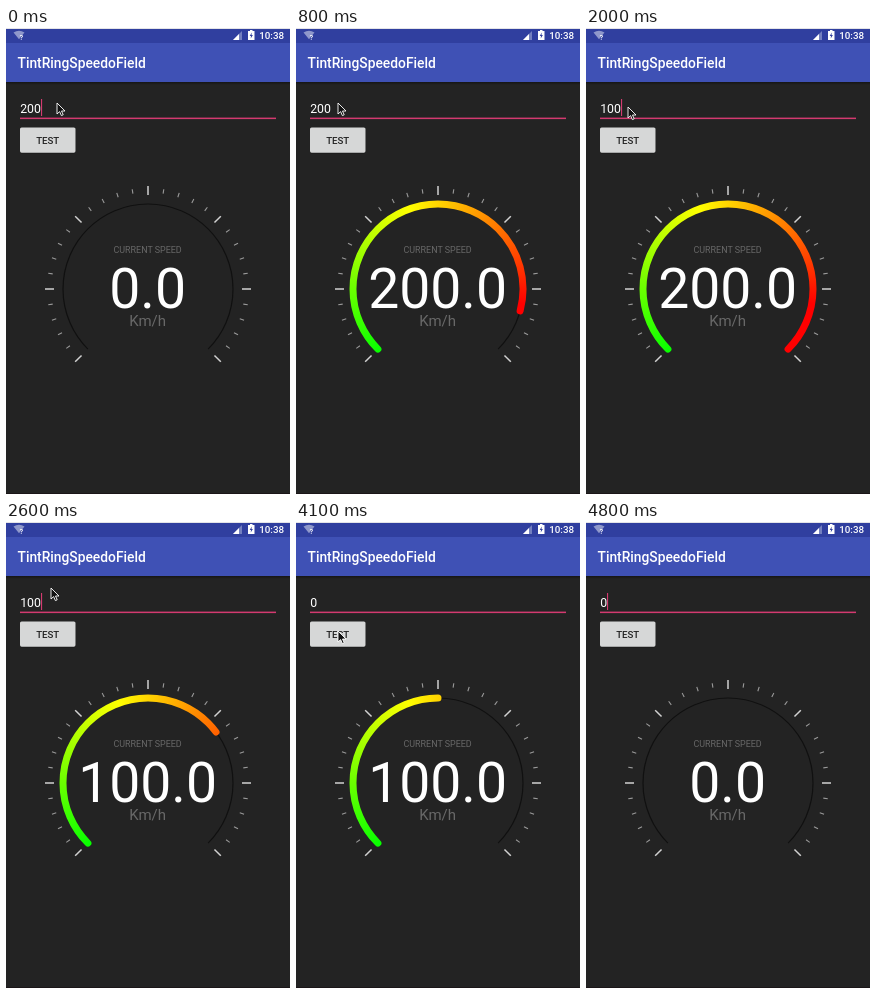
These frames come from a looping animation (284 by 466 pixels, 5 s). An HTML page with a canvas:

```html
<!DOCTYPE html>
<html lang="en">
<head>
<meta charset="utf-8">
<title>Speed gauge</title>
<style>
  html, body { margin: 0; width: 100%; height: 100%; overflow: hidden; background: #232323; }
  svg, canvas { position: absolute; left: 0; top: 0; width: 284px; height: 466px; display: block; }
  text { font-family: Roboto, "Noto Sans", sans-serif; fill: #fff; }
  .mid { text-anchor: middle; }
  .medium { font-weight: 500; }
  .dim { fill: #686868; }
</style>
</head>
<body>
<svg viewBox="0 0 284 466">
  <defs>
    <linearGradient id="shade" x1="0" y1="0" x2="0" y2="1">
      <stop offset="0" stop-color="#000" stop-opacity=".4"/>
      <stop offset="1" stop-color="#000" stop-opacity="0"/>
    </linearGradient>
  </defs>
  <rect width="284" height="466" fill="#232323"/>
  <rect y="465" width="284" height="1" fill="#1b1618"/>
  <rect y="54" width="284" height="3" fill="url(#shade)"/>
  <rect width="284" height="54" fill="#3f51b5"/>
  <rect width="284" height="15" fill="#303f9f"/>
  <rect width="284" height="1" fill="#e4e4e8"/>

  <!-- status bar -->
  <path d="M7.5 4.5Q13 1.100 18.500 4.500L13 11.300Z" fill="#8f98cb"/>
  <text x="13.600" y="11.800" font-size="7.500" class="medium">?</text>
  <path d="M227 12H236V3Z" fill="#7480bf"/>
  <path d="M227 12H233V6Z" fill="#fff"/>
  <path d="M242 3H244V2H246.500V3H248.500V12H242Z" fill="#fff"/>
  <path d="M245.800 4.500L243.700 8H245L244.700 10.500L246.900 7H245.500Z" fill="#303f9f"/>
  <text x="253.200" y="10.700" font-size="9.800" class="medium">10:38</text>

  <text x="11.500" y="39.500" font-size="13.800" class="medium">TintRingSpeedoField</text>

  <!-- input and button -->
  <text id="field" x="14.200" y="84.600" font-size="12.300"></text>
  <rect x="14" y="89.600" width="256" height="1.500" fill="#d43a70"/>
  <rect id="caret" y="71" width="1.100" height="17" fill="#d43a70"/>
  <rect x="14" y="100.300" width="55.500" height="25.200" rx="1.600" fill="#000" opacity=".3"/>
  <rect x="14" y="99.500" width="55.500" height="25.200" rx="1.600" fill="#d6d7d7"/>
  <text x="41.700" y="115.700" font-size="9.700" class="mid medium" style="fill:#222">TEST</text>

  <!-- gauge -->
  <g id="ticks"></g>
  <path d="M81.900 321.100A85 85 0 1 1 202.100 321.100" fill="none" stroke="#101010" stroke-width="1.200"/>
  <text x="141.600" y="224.600" font-size="8.950" class="mid dim">CURRENT SPEED</text>
  <text id="speed" x="141.600" y="279.500" font-size="55.300" class="mid"></text>
  <text x="141.600" y="297.700" font-size="15" class="mid dim">Km/h</text>

  <path id="mouse" d="M0 0V11L2.600 8.600L4.400 12.600L6.200 11.800L4.500 8H8Z"
        fill="#111" stroke="#fff" stroke-width=".9" stroke-linejoin="round"/>
</svg>
<canvas id="arc"></canvas>
<script>
const LOOP = 5000, STEP = 100, CX = 142, CY = 261, RADIUS = 85;
const rad = deg => deg * Math.PI / 180;
const $ = id => document.getElementById(id);

const typed = [
  [0, "200"], [1300, "20"], [1400, "2"], [1500, ""], [1700, "1"], [1800, "10"],
  [1900, "100"], [3100, "10"], [3300, "1"], [3400, ""], [3700, "0"]
];
const caretOff = [[200, 500], [800, 1100], [2200, 2500], [2800, 3100], [4000, 4300], [4500, 4800]];
// start, duration, from and to in degrees, shown value
const sweeps = [
  [330, 600, 0, 270, "200.0"],
  [2259, 600, 270, 135, "100.0"],
  [4210, 590, 135, 0, "0.0"]
];
const mousePath = [
  [0, 51, 75], [100, 51, 75], [300, 42, 109], [500, 42, 109], [800, 42, 75],
  [1000, 42, 79], [2000, 42, 79], [2200, 42, 109], [2300, 42, 107], [2600, 45, 66],
  [2700, 45, 58], [2900, 45, 58], [3100, 42, 81], [3800, 42, 81], [4100, 42, 109], [5000, 42, 109]
];

const last = (list, t) => list.filter(row => row[0] <= t).pop();

function mouseAt(t) {
  const i = mousePath.findIndex(p => p[0] > t);
  const [a, x0, y0] = mousePath[i - 1], [b, x1, y1] = mousePath[i];
  const k = (t - a) / (b - a);
  return [x0 + (x1 - x0) * k, y0 + (y1 - y0) * k];
}

function sweepAt(t) {
  const s = last(sweeps, t);
  if (!s) return { angle: 0, label: "0.0" };
  const [start, span, from, to, label] = s;
  const k = Math.min(1, (t - start) / span);
  return { angle: from + (to - from) * (1 - Math.cos(Math.PI * k)) / 2, label };
}

for (let i = -15; i <= 15; i++) {
  const long = i % 5 === 0;
  const line = document.createElementNS("http://www.w3.org/2000/svg", "line");
  const attrs = {
    x1: CX, x2: CX,
    y1: CY - (long ? 94 : 96.5), y2: CY - (long ? 103 : 101),
    stroke: long ? "#d2d2d2" : "#9a9a9a",
    "stroke-width": long ? 1.5 : 1.1,
    transform: `rotate(${i * 9} ${CX} ${CY})`
  };
  for (const key in attrs) line.setAttribute(key, attrs[key]);
  $("ticks").append(line);
}

const canvas = $("arc"), ctx = canvas.getContext("2d");
const ratio = window.devicePixelRatio || 1;
canvas.width = 284 * ratio;
canvas.height = 466 * ratio;
ctx.scale(ratio, ratio);
const hues = ctx.createConicGradient(rad(130), CX, CY);
["#0f0", "#ff0", "#f00", "#f00"].forEach((c, i) => hues.addColorStop(i / 3, c));
ctx.strokeStyle = hues;
ctx.lineWidth = 7;
ctx.lineCap = "round";

function drawArc(angle) {
  ctx.clearRect(0, 0, 284, 466);
  if (angle < 0.1) return;
  ctx.beginPath();
  ctx.arc(CX, CY, RADIUS, rad(135), rad(135 + angle));
  ctx.stroke();
}

function render(t) {
  const text = last(typed, t)[1];
  const { angle, label } = sweepAt(t);
  const [x, y] = mouseAt(t);
  $("field").textContent = text;
  $("caret").setAttribute("x", 14 + text.length * 7);
  $("caret").style.display = caretOff.some(([a, b]) => t >= a && t < b) ? "none" : "";
  $("speed").textContent = label;
  $("mouse").setAttribute("transform", `translate(${x} ${y})`);
  $("mouse").style.display = t >= 4500 ? "none" : "";
  drawArc(angle);
}

const began = performance.now();
function tick() {
  const t = (performance.now() - began) % LOOP;
  render(Math.floor(t / STEP) * STEP);
  requestAnimationFrame(tick);
}
tick();
</script>
</body>
</html>
```
